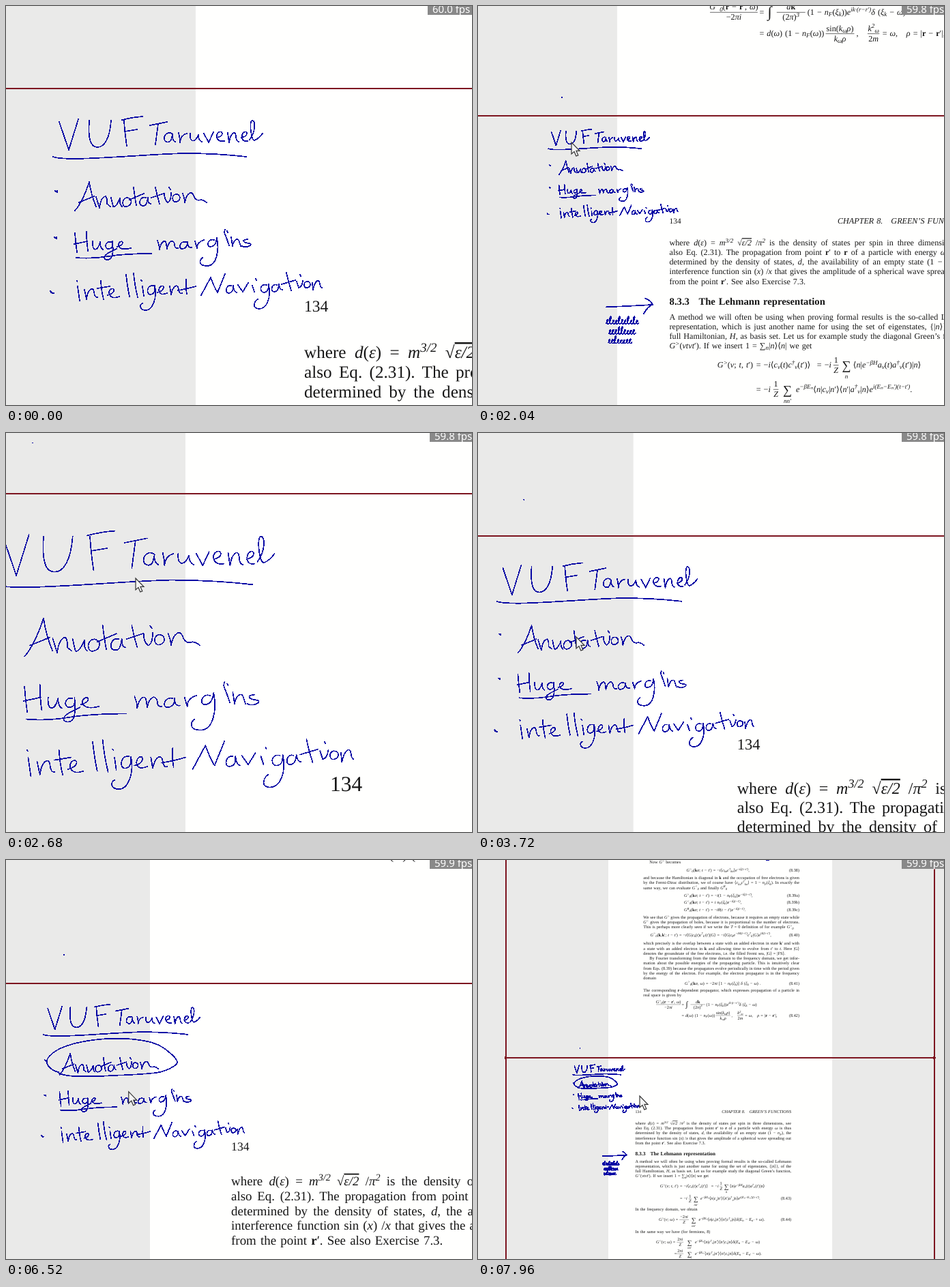
An HTML page that plays this animation: 683 by 585 pixels, repeating every 8 s.

```html
<!DOCTYPE html>
<html lang="en">
<head>
<meta charset="utf-8">
<title>Zooming notes</title>
<style>
html, body { margin: 0; width: 100%; height: 100%; overflow: hidden; background: #eaeae9; }
svg { display: block; width: 683px; height: 585px; }
text { white-space: pre; text-rendering: geometricPrecision; }
#print { font: 25.2px "Liberation Serif", serif; fill: #161616; }
#print text { word-spacing: .08em; }
#print path { stroke: #161616; stroke-width: 1.3; }
.i { font-style: italic; }
.b { font-weight: bold; }
.o { font-style: italic; text-decoration: overline; }
.s { font-style: italic; font-size: 75%; }
#ink, #rule { fill: none; stroke-linecap: round; stroke-linejoin: round; shape-rendering: crispEdges; }
#ink { stroke: #0606a4; }
#rule { stroke: #7d1520; }
#fps { font: 15px "Noto Sans", sans-serif; fill: #fff; }
</style>
</head>
<body>
<svg viewBox="0 0 683 585">
  <rect width="683" height="585" fill="#eaeae9"/>
  <g id="world">
    <rect x="278" y="-1750" width="1323" height="3742" fill="#fffffe"/>
    <g id="print"></g>
    <g id="rule">
      <path d="M-327 121H2205M-327 -1750V1992M2205 -1750V1992"/>
      <path id="knots" d="M-327 121h0M2205 121h0"/>
    </g>
    <g id="ink"></g>
  </g>
  <g id="badge">
    <rect id="plate" y="0" width="70" height="13" fill="#898989"/>
    <text id="fps" y="10"></text>
  </g>
  <path id="cursor" d="M0 0V17L4 13.4L6.8 20L9.8 18.8L7 12.4H12Z" fill="#f4f4f4" stroke="#333" stroke-width="1.2"/>
</svg>
<script>
const $ = id => document.getElementById(id);
const NS = "http://www.w3.org/2000/svg";
const LOOP = 8000;

function add(parent, tag, attrs) {
  const el = document.createElementNS(NS, tag);
  for (const k in attrs) el.setAttribute(k, attrs[k]);
  return parent.appendChild(el);
}

// ---- Printed pages. Markup: ~italic~ #bold# @overline@ ^{sup} _{sub}
function rich(s) {
  let level = 0, out = "";
  const part = /([\^_])\{([^}]*)\}|~([^~]*)~|#([^#]*)#|@([^@]*)@|([^\^_~#@]+)/g;
  for (const [, mark, small, it, bold, over, plain] of s.matchAll(part)) {
    const want = mark === "^" ? -9 : mark === "_" ? 5 : 0;
    const cls = mark ? "s" : it ? "i" : bold ? "b" : over ? "o" : "";
    out += `<tspan class="${cls}" dy="${want - level}">${small || it || bold || over || plain}</tspan>`;
    level = want;
  }
  return out;
}

function put(x, y, s, opt = {}) {
  const el = add($("print"), "text", { x, y, "text-anchor": opt.anchor || "start" });
  if (opt.size) el.style.fontSize = opt.size + "px";
  el.innerHTML = rich(s);
  return el;
}

function justify(x, y, s, width) {
  const el = put(x, y, s);
  const gaps = el.textContent.split(" ").length - 1;
  el.style.wordSpacing = 0;
  el.style.wordSpacing = (width - el.getComputedTextLength()) / gaps + "px";
}

const LEAD = 29.2, COL = 922;
// A paragraph whose last line stays ragged.
function para(x, y, lines, indent = 0) {
  lines.forEach((s, i) => {
    const dx = i ? 0 : indent, yy = y + i * LEAD;
    if (i < lines.length - 1) justify(x + dx, yy, s, COL - dx);
    else put(x + dx, yy, s);
  });
}

function frac(x, y, w, top, bottom) {
  put(x, y - 15, top, { anchor: "middle" });
  put(x, y + 16, bottom, { anchor: "middle" });
  add($("print"), "path", { d: `M${x - w / 2} ${y - 7}h${w}` });
}

function sum(x, y, under) {
  put(x, y + 7, "∑", { anchor: "middle", size: 38 });
  put(x, y + 29, `_{${under}}`, { anchor: "middle" });
}

const num = (x, y, n) => put(x, y, `(8.${n})`, { anchor: "end" });

function leftPage() {
  const x = 485, r = x + COL;
  put(x + 36, -1028, "Now ~G~^{>} becomes");
  put(740, -980, "~G~^{>}_{0}(#k#~σ~; ~t~ − ~t~′) = −~i~⟨~c~_{kσ}~c~^{†}_{kσ}⟩~e~^{−iξ(t−t′)},"); num(r, -980, 38);
  para(x, -935, [
    "and because the Hamiltonian is diagonal in #k# and the occupation of free electrons is given",
    "by the Fermi-Dirac distribution, we of course have ⟨~c~_{kσ}~c~^{†}_{kσ}⟩ = 1 − ~n~_{F}(~ξ~_{k}). In exactly the",
    "same way, we can evaluate ~G~^{<}_{0} and finally ~G~^{R}_{0}"]);
  put(726, -831, "~G~^{>}_{0}(#k#~σ~; ~t~ − ~t~′) = −~i~(1 − ~n~_{F}(~ξ~_{k}))~e~^{−iξ(t−t′)},"); num(r, -831, "39a");
  put(726, -790, "~G~^{<}_{0}(#k#~σ~; ~t~ − ~t~′) = ~i~ ~n~_{F}(~ξ~_{k})~e~^{−iξ(t−t′)},"); num(r, -790, "39b");
  put(726, -746, "~G~^{R}_{0}(#k#~σ~; ~t~ − ~t~′) = −~iθ~(~t~ − ~t~′)~e~^{−iξ(t−t′)}."); num(r, -746, "39c");
  para(x, -702, [
    "We see that ~G~^{>} gives the propagation of electrons, because it requires an empty state while",
    "~G~^{<} gives the propagation of holes, because it is proportional to the number of electrons.",
    "This is perhaps more clearly seen if we write the ~T~ = 0 definition of for example ~G~^{>}_{0}"]);
  put(526, -598, "~G~^{>}_{0}(#k#,#k#′; ~t~ − ~t~′) = −~i~⟨G|~c~_{k}(~t~)~c~^{†}_{k′}(~t~′)|G⟩ = −~i~⟨G|~c~_{k}~e~^{−iH(t−t′)}~c~^{†}_{k′}|G⟩~e~^{iE(t−t′)},"); num(r, -598, 40);
  para(x, -547, [
    "which precisely is the overlap between a state with an added electron in state #k#′ and with",
    "a state with an added electron in #k# and allowing time to evolve from ~t~′ to ~t~. Here |G⟩",
    "denotes the groundstate of the free electrons, i.e. the filled Fermi sea, |G⟩ = |FS⟩."]);
  para(x, -459, [
    "By Fourier transforming from the time domain to the frequency domain, we get infor-",
    "mation about the possible energies of the propagating particle. This is intuitively clear",
    "from Eqs. (8.39) because the propagators evolve periodically in time with the period given",
    "by the energy of the electron. For example, the electron propagator is in the frequency",
    "domain"], 36);
  put(730, -312, "~G~^{>}_{0}(#k#~σ~, ~ω~) = −2~πi~ [1 − ~n~_{F}(~ξ~_{k})] ~δ~ (~ξ~_{k} − ~ω~) ."); num(r, -312, 41);
  para(x, -270, [
    "The corresponding #r#-dependent propagator, which expresses propagation of a particle in",
    "real space is given by"]);
  frac(633, -187, 145, "~G~^{>}_{0}(#r# − #r#′, ~ω~)", "−2~πi~");
  put(711, -187, "=");
  put(736, -180, "∫", { size: 46 });
  frac(807, -187, 87, "~d~#k#", "(2~π~)^{3}");
  put(857, -187, "(1 − ~n~_{F}(~ξ~_{k}))~e~^{ik·(r−r′)}~δ~ (~ξ~_{k} − ~ω~)");
  put(711, -122, "= ~d~(~ω~) (1 − ~n~_{F}(~ω~))");
  frac(956, -122, 87, "sin(~k~_{ω}~ρ~)", "~k~_{ω}~ρ~");
  put(1006, -122, ",");
  frac(1058, -122, 36, "~k~^{2}_{ω}", "2~m~");
  put(1085, -122, "= ~ω~,");
  put(1158, -122, "~ρ~ = |#r# − #r#′|,");
  num(r, -122, 42);
}

function rightPage() {
  const x = 437, r = x + COL;
  put(x, 448, "134", { size: 23.6 });
  put(r, 448, "~CHAPTER 8.   GREEN’S FUNCTIONS~", { anchor: "end" });
  para(x, 516, [
    "where ~d~(~ε~) = ~m~^{3/2} √@ε/2@ /~π~^{2} is the density of states per spin in three dimensions, see",
    "also Eq. (2.31). The propagation from point #r#′ to #r# of a particle with energy ~ω~ is thus",
    "determined by the density of states, ~d~, the availability of an empty state (1 − ~n~_{F}), the",
    "interference function sin (~x~) /~x~ that gives the amplitude of a spherical wave spreading out",
    "from the point #r#′. See also Exercise 7.3."]);
  put(x, 696, "#8.3.3#", { size: 30.5 });
  put(x + 89, 696, "#The Lehmann representation#", { size: 30.5 });
  para(x, 741, [
    "A method we will often be using when proving formal results is the so-called Lehmann",
    "representation, which is just another name for using the set of eigenstates, {|~n~⟩}, of the",
    "full Hamiltonian, ~H~, as basis set. Let us for example study the diagonal Green’s function,",
    "~G~^{>}(~νtνt~′). If we insert 1 = ∑_{n}|~n~⟩⟨~n~| we get"]);
  put(583, 887, "~G~^{>}(~ν~; ~t~, ~t~′)");
  put(701, 887, "= −~i~⟨~c~_{ν}(~t~)~c~^{†}_{ν}(~t~′)⟩");
  put(886, 887, "= −~i~");
  frac(944, 887, 16, "1", "~Z~");
  sum(976, 887, "n");
  put(996, 887, "⟨~n~|~e~^{−βH}~a~_{ν}(~t~)~a~^{†}_{ν}(~t~′)|~n~⟩");
  put(701, 961, "= −~i~");
  frac(761, 961, 16, "1", "~Z~");
  sum(796, 961, "nn′");
  put(822, 961, "~e~^{−βEₙ}⟨~n~|~c~_{ν}|~n~′⟩⟨~n~′|~a~^{†}_{ν}|~n~⟩~e~^{i(Eₙ−Eₙ′)(t−t′)}.");
  num(r, 961, 43);
  put(x, 1024, "In the frequency domain, we obtain");
  put(576, 1085, "~G~^{>}(~ν~; ~ω~) =");
  frac(726, 1085, 56, "−2~πi~", "~Z~");
  sum(782, 1085, "nn′");
  put(812, 1085, "~e~^{−βEₙ}⟨~n~|~c~_{ν}|~n~′⟩⟨~n~′|~c~^{†}_{ν}|~n~⟩~δ~(~E~_{n} − ~E~_{n′} + ~ω~).");
  num(r, 1085, 44);
  put(x, 1157, "In the same way we have (for fermions, 8)");
  put(560, 1218, "~G~^{<}(~ν~; ~ω~) =");
  frac(702, 1218, 40, "2~πi~", "~Z~");
  sum(758, 1218, "nn′");
  put(790, 1218, "~e~^{−βEₙ}⟨~n~|~c~^{†}_{ν}|~n~′⟩⟨~n~′|~c~_{ν}|~n~⟩~δ~(~E~_{n} − ~E~_{n′} − ~ω~)");
  put(668, 1286, "=");
  frac(702, 1286, 40, "2~πi~", "~Z~");
  sum(758, 1286, "nn′");
  put(790, 1286, "~e~^{−βEₙ′}⟨~n~|~c~^{†}_{ν}|~n~′⟩⟨~n~′|~c~_{ν}|~n~⟩~δ~(~E~_{n} − ~E~_{n′} − ~ω~).");
}

// ---- Handwriting
const pen = d => add($("ink"), "path", { d });

function handwriting() {
  // heading
  pen("M78 170L92 211L106 166M122 168C120 195 124 207 134 207S152 195 154 168M173 168Q174 185 177 205M170 167Q185 163 200 162M174 184L192 181");
  pen("M211 175L236 170M223 173L219 203M243 187C234 182 228 196 235 199S243 193 244 188Q243 196 248 199M253 186Q255 193 255 200Q256 189 265 187M270 187C269 199 276 202 282 189Q282 197 287 199");
  pen("M290 187L297 200L304 185M309 193C320 191 318 182 312 185S308 200 320 198M325 186L327 200C329 186 336 182 337 190Q337 198 341 199M345 193C356 191 354 182 349 185S344 200 354 198M357 196C366 184 366 168 361 168S359 196 364 197Q370 195 376 187");
  pen("M69 221Q75 224 105 224C170 222 200 218 260 216Q310 216 352 221");
  // bullets
  pen("M72 271l3 2l0 -2l-2 1M71 339l3 2l0 -2l-2 1M65 418l3 3l2 0l-4 -1");
  // Annotation
  pen("M101 300Q112 288 122 258Q125 278 132 294M107 288L129 279M132 280L137 296Q139 280 146 279Q149 283 148 290L153 294M154 281L157 294Q161 296 167 282Q166 291 170 294M178 281C169 281 169 296 177 294S186 283 178 281");
  pen("M187 266Q189 282 191 292M181 284L202 275M205 281C196 278 193 292 200 293S207 285 208 281Q208 290 212 290M219 266Q222 280 225 290M213 281L231 275M232 275Q232 284 237 288Q242 286 242 274M239 266L241 269M249 276C242 277 243 289 250 287S256 276 249 276M259 275Q262 282 262 288C265 274 272 270 275 278Q278 287 286 284Q291 285 294 288");
  // Huge margins
  pen("M101 333Q102 347 104 361M100 349Q110 347 119 345M118 331Q118 346 120 359M127 345C126 360 134 361 138 346Q138 355 142 357M154 346C144 344 144 357 151 356S156 348 156 345C158 362 156 372 149 372S142 366 152 361L162 356M163 353C174 350 172 343 167 346S164 360 183 355M103 369Q125 371 150 367T213 363");
  pen("M222 344Q225 351 225 357C227 345 234 341 235 349L236 356C238 345 245 341 247 349Q247 356 252 355M264 346C254 344 252 357 259 356S266 349 266 346Q266 355 272 354M277 345L280 355Q280 346 290 343M305 343C295 340 293 354 300 353S308 346 309 340C313 360 308 381 295 381S283 373 288 369");
  pen("M321 328Q319 332 322 337L327 351M324 330L325 332M330 339L332 352C334 341 341 339 342 346L344 352M354 342C344 343 348 347 356 348S353 356 346 352");
  // intelligent Navigation
  pen("M105 411L108 432M104 403L104.5 404M115 416L118 430C120 414 128 411 129 419Q130 428 134 427M139 403Q140 419 143 430M134 414L152 411M149 424C161 421 160 412 154 415S151 432 166 426M176 394Q178 412 181 426M187 392Q189 412 193 427M200 411L202 425M198 402L199 403");
  pen("M216 410C206 408 205 424 212 423S218 415 218 410C222 430 214 446 205 446S195 438 200 436M222 420C234 417 232 408 227 411S223 427 236 421M240 411L242 423C245 409 252 407 253 415Q254 423 258 421M264 401Q263 412 265 422M252 417Q265 415 278 411");
  pen("M286 424L300 398Q305 412 310 420L321 393M330 410C322 408 320 422 327 421S333 413 333 410Q334 419 338 420M340 409L347 419L355 406M361 410L364 419M366 400L367 402M382 409C372 406 371 420 378 420S385 412 385 408C389 428 382 444 371 444S364 433 369 430");
  pen("M397 409C389 406 387 419 393 419S400 411 400 408Q401 416 405 416M411 391Q414 405 418 417M404 408L424 402M426 404L429 413Q434 412 435 403M431 394L432 396M441 404C435 405 436 415 442 413S447 404 441 404M449 406L450 416C453 402 459 399 460 407Q461 413 463 413");
  // arrow and side note
  pen("M244 703Q320 700 386 696M363 676Q378 682 386 695Q370 703 359 723");
  pen("M1200 -1060Q1214 -1040 1228 -1050");
  scrawl(245, 752, 11, 3);
  scrawl(253, 783, 9, 8);
  scrawl(251, 811, 8, 5);
}

// A line of tiny cursive loops
function scrawl(x, y, n, seed) {
  let d = `M${x} ${y}`;
  for (let i = 0; i < n; i++) {
    seed = (seed * 73 + 41) % 101;
    const h = seed % 3 ? 11 + seed % 5 : 27;
    d += `c13 ${-h} -2 ${-h} 2 0q3 5 7 0`;
  }
  pen(d);
}

leftPage();
rightPage();
handwriting();
const speck = pen("M109.6 65h.8");
const ring = pen("M100 297C112 302 128 303 143 303Q180 303 210 301C245 300 270 298 290 296Q312 292 323 284Q333 279 331 273Q327 264 318 258C303 243 285 236 265 233C238 228 208 228 183 230C150 233 122 239 101 249Q75 263 76 276Q80 290 100 295");
const ringLen = ring.getTotalLength();

// ---- Motion
// time, zoom, page edge x, page break y
const VIEW = [
  [0, 1, 278, 121], [1520, 1, 278, 121], [1640, .749, 242, 139],
  [2040, .482, 204, 161], [2200, .43, 197, 165], [2320, .43, 197, 165],
  [2680, 1.333, 263, 89], [2800, 1.333, 263, 89], [3160, 1.5, 271.5, 73],
  [3280, 1.5, 271.5, 73], [3960, .749, 211, 181], [7120, .749, 211, 181],
  [7280, .367, 195, 264], [7360, .367, 195, 264], [7720, .248, 191, 290]
];
const POINTER = [
  [280, 110, 53], [440, 110, 73], [640, 110, 73], [1040, 424, 406],
  [1440, 135, 193], [1640, 135, 195], [2040, 137, 200], [2320, 141, 201],
  [2680, 190, 213], [3200, 195, 215], [3700, 144, 299], [4200, 144, 299],
  [4360, 150, 213], [4560, 268, 391], [4740, 78, 312], [6000, 78, 312],
  [6640, 203, 346], [6720, 201, 345], [7120, 201, 345], [7280, 170, 343],
  [7720, 183, 344], [7960, 237, 346]
];
const RING = [[4740, 0], [5200, .47], [5840, .9], [6000, 1]];

const mix = (a, b, u) => a + (b - a) * u;

function span(keys, t) {
  let i = 0;
  while (i < keys.length - 2 && t >= keys[i + 1][0]) i++;
  const [a, b] = [keys[i], keys[i + 1]];
  return [a, b, Math.min(1, Math.max(0, (t - a[0]) / (b[0] - a[0])))];
}

function at(keys, t) {
  const [a, b, u] = span(keys, t);
  return a.slice(1).map((v, i) => mix(v, b[i + 1], u));
}

// Zoom is exponential; the offset follows it so that one point stays fixed.
function viewAt(t) {
  const [a, b, u] = span(VIEW, t);
  const s = a[1] * (b[1] / a[1]) ** u;
  const k = a[1] === b[1] ? u : (s - a[1]) / (b[1] - a[1]);
  return [s, mix(a[2], b[2], k), mix(a[3], b[3], k)];
}

function draw(t) {
  const [s, ex, ey] = viewAt(t);
  $("world").setAttribute("transform", `translate(${ex} ${ey}) scale(${s}) translate(-278 -121)`);
  $("ink").style.strokeWidth = 1.7 / s;
  $("rule").style.strokeWidth = 1.8 / s;
  $("knots").style.strokeWidth = 4 / s;

  speck.style.visibility = t < 280 ? "hidden" : "visible";
  const [part] = at(RING, t);
  ring.style.visibility = part > 0 ? "visible" : "hidden";
  ring.style.strokeDasharray = part < 1 ? `${part * ringLen} ${ringLen + 9}` : "none";

  let [x, y] = at(POINTER, t);
  if (part > 0 && part < 1) {
    const p = ring.getPointAtLength(Math.max(0, part * ringLen - 14 * Math.min(1, part * 3)));
    x = ex + (p.x - 278) * s;
    y = ey + (p.y - 121) * s;
  }
  $("cursor").setAttribute("transform", `translate(${x} ${y})`);
  $("cursor").style.visibility = t < 280 ? "hidden" : "visible";

  const rate = t < 2000 ? "60.0" : t < 5120 ? "59.8" : "59.9";
  const left = t < 2000 ? 625 : 628;
  $("fps").textContent = rate + " fps";
  $("fps").setAttribute("x", left);
  $("plate").setAttribute("x", left - 7);
}

const start = performance.now();
function tick() {
  draw((performance.now() - start) % LOOP);
  requestAnimationFrame(tick);
}
tick();
</script>
</body>
</html>
```
